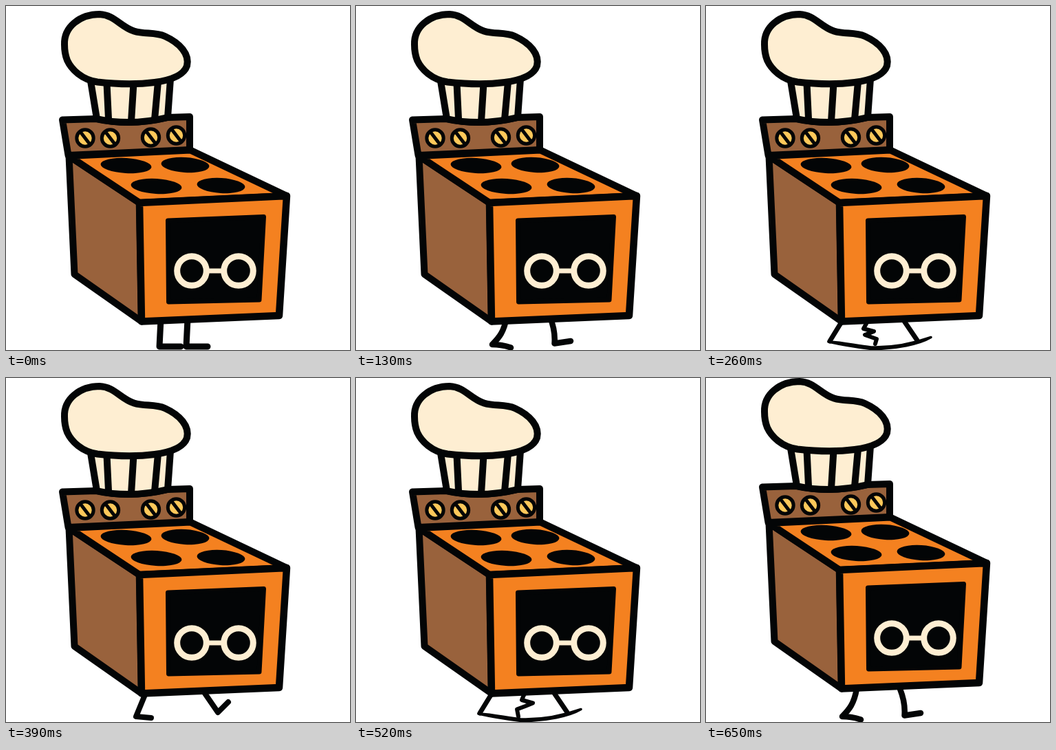
Recreate the animation shown at these times as an HTML page with a canvas. Size 500x500 px, loop 0.78 s.

```html
<!DOCTYPE html>
<html lang="en">
<head>
<meta charset="utf-8">
<title>Walking oven</title>
<style>
html, body { margin: 0; width: 100%; height: 100%; overflow: hidden; background: #fff; }
canvas { display: block; width: 500px; height: 500px; }
</style>
</head>
<body>
<canvas id="stage" width="500" height="500"></canvas>
<script>
const ctx = document.getElementById('stage').getContext('2d');
const STEP = 130;
const INK = '#030506', ORANGE = '#f48120', BROWN = '#99623c', CREAM = '#feeed2', GOLD = '#fdc85a';

function paint(path, fill, width, ink = INK) {
  const p = new Path2D(path);
  if (fill) {
    ctx.fillStyle = fill;
    ctx.fill(p);
  }
  if (width) {
    ctx.strokeStyle = ink;
    ctx.lineWidth = width;
    ctx.stroke(p);
  }
}

function oval(x, y, rx, ry, tilt, fill, width, ink = INK) {
  ctx.beginPath();
  ctx.ellipse(x, y, rx, ry, tilt, 0, Math.PI * 2);
  if (fill) {
    ctx.fillStyle = fill;
    ctx.fill();
  }
  if (width) {
    ctx.strokeStyle = ink;
    ctx.lineWidth = width;
    ctx.stroke();
  }
}

function knob(x, y) {
  oval(x, y, 12.2, 12.2, 0, GOLD, 5);
  paint(`M${x - 6.5} ${y - 8.5} L${x + 6.5} ${y + 8.5}`, null, 5);
}

function drawHat() {
  paint('M123 109 L132 164 Q180 175 235 162 L239 106 Z', CREAM, 10);
  paint('M146.5 112 L149 164 M185.5 112 L182 168 M221 110 L216 165', null, 10);
  paint('M85 56 C84 30 108 12 136 12 C158 13 166 30 186 36.5 C202 41.5 216 37.5 231 44 ' +
    'C253 54 267 70 263 87 C258 102 238 108 216 111 C186 115 155 113 133 110.5 ' +
    'C110 107 95 92 89 79 Q85 69 85 56 Z', CREAM, 10);
}

function drawBody() {
  paint('M82 165.5 L131 164 Q182 175 235 162 L267 161 L267 209 L90.5 217 Z', BROWN, 10);
  drawHat();
  [[115, 192], [151.5, 192], [210.5, 191], [247.5, 188]].forEach(k => knob(...k));

  paint('M91.5 218 L194 286 L197 458.5 L99.5 390 Z', BROWN, 10);
  paint('M91.5 218 L268 209.5 L408 276 L194 286 Z', ORANGE, 10);
  paint('M194 286 L408 276 L397 450 L197 458.5 Z', ORANGE, 10.5);

  [[174.5, 232, 37], [260.5, 231, 35], [218.5, 262, 37], [312.5, 261, 35]]
    .forEach(([x, y, r]) => oval(x, y, r, 11, 0.06, INK));

  paint('M235.5 312 L374.5 306.5 L368 427 L236.5 430 Z', INK, 7);
  oval(270, 385, 21.3, 21.3, 0, null, 9, CREAM);
  oval(338, 385, 21.3, 21.3, 0, null, 9, CREAM);
  paint('M292 385 H316', null, 7, CREAM);
}

const stand = () => {
  paint('M225 455 L223 495 H254 M264 455 L262 495 H293', null, 9);
};

const stride = () => {
  paint('M219 452 C215 474 208 482 198 492 Q212 492 225 496.5 ' +
    'M282 452 Q290 472 288.5 490.5 L312 487', null, 8.5);
};

const kick = () => {
  paint('M203 458 L189 492 L211 494 M286 454 L308 486 L323 471', null, 8);
};

// A blurred run: both legs out, one arc for the feet and a springy middle leg.
const run = spring => () => {
  paint('M199 456 L180 487 M286 455 L307 486', null, 7);
  paint('M178 488 C202 489 218 494 240 496 C272 497 300 491 327 481.5 ' +
    'C311 491 276 499 240 498.5 C220 496 200 493 178 488 Z', INK, 3.5);
  paint(spring, null, 6);
};

const POSES = [
  stand,
  stride,
  run('M236 456 L229 469 L244 473 L231 478 L248 484 L246 491'),
  kick,
  run('M246 456 L241 468 L257 472.5 L246 477 L234 481.5 L236 492'),
  stride
];

function frame(now) {
  const i = Math.floor(now / STEP) % POSES.length;
  ctx.fillStyle = '#fff';
  ctx.fillRect(0, 0, 500, 500);
  ctx.lineCap = ctx.lineJoin = 'round';
  POSES[i]();
  ctx.save();
  ctx.translate(0, i === 5 ? -7 : 0);
  drawBody();
  ctx.restore();
}

const start = performance.now();
function tick() {
  frame(performance.now() - start);
  requestAnimationFrame(tick);
}
tick();
</script>
</body>
</html>
```
